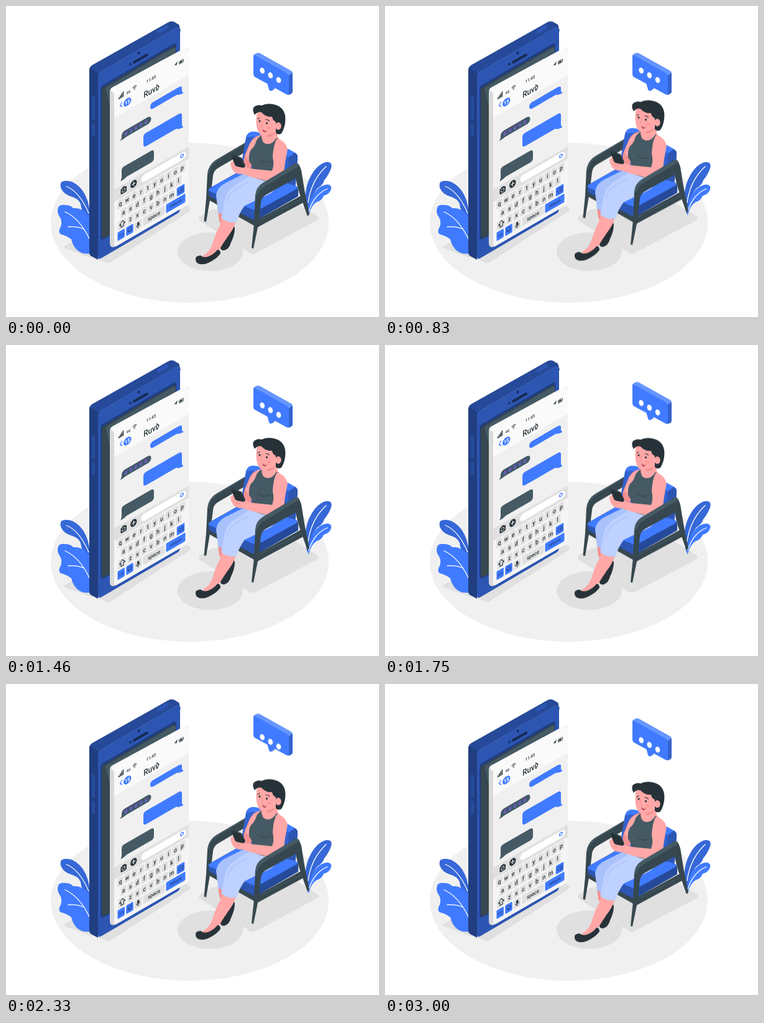
These frames come from a looping animation (600x500 px, 3040 ms). An HTML page:

```html
<!DOCTYPE html>
<html lang="en">
<head>
<meta charset="utf-8">
<title>Chat</title>
<style>
html, body { margin: 0; width: 100%; height: 100%; overflow: hidden; background: #fff; }
svg { display: block; width: 600px; height: 500px; }
text { font-family: Roboto, Inter, sans-serif; text-anchor: middle; }
</style>
</head>
<body>
<svg id="stage" viewBox="0 0 600 500" xmlns="http://www.w3.org/2000/svg"></svg>
<script>
const BLUE = '#407bff', MID = '#2d56b3', DEEP = '#264a99', NIGHT = '#203e80';
const INK = '#263238', SLATE = '#37474f', STEEL = '#455a64';
const SKIN = '#ffa8a7', BLUSH = '#f28f8f', PALE = '#f0f0f0', GREY = '#e0e0e0';

const p = (d, fill) => `<path d="${d}" fill="${fill}"/>`;
const line = (d, color, w = 1) =>
  `<path d="${d}" fill="none" stroke="${color}" stroke-width="${w}" stroke-linecap="round" stroke-linejoin="round"/>`;
const dot = (x, y, r, fill, ry = r) => `<ellipse cx="${x}" cy="${y}" rx="${r}" ry="${ry}" fill="${fill}"/>`;
const box = (x, y, w, h, r, fill) => `<rect x="${x}" y="${y}" width="${w}" height="${h}" rx="${r}" fill="${fill}"/>`;
// Text squeezed by the isometric projection
const label = (s, x, y, size, fill = INK, weight = 500) =>
  `<text transform="translate(${x} ${y}) scale(.866 1)" font-size="${size}" font-weight="${weight}" fill="${fill}">${s}</text>`;
const group = (id, body) => `<g id="${id}">${body}</g>`;

function floor() {
  return dot(295.5, 348.5, 223.5, PALE, 128.5)
    + p('M94 386L112 376L140 390V406L96 390Q92 388 94 386Z', GREY)
    + p('M146 406L162 413Q166 414 170 411L294 331Q300 327 294 323L280 316Z', GREY)
    + p('M312 338L332 327L460 312L500 337Q506 341 500 345L402 397Q397 400 392 397L313 346Q308 342 312 338Z', GREY)
    + dot(328.5, 395, 52.5, GREY, 31);
}

function plants() {
  return p('M89 283Q96 279 107 283Q121 290 128 305Q136 322 135 345L128 335Q121 330 120 318Q116 309 104 306Q92 302 88 292Q87 286 89 283Z', '#3668d8')
    + line('M97 290Q118 298 133 333', '#fff', 1.3)
    + p('M84 324Q86 319 95 320Q104 320 108 325Q121 324 129 333L137 340V398Q121 400 113 391Q107 384 105 375Q97 369 88 367Q83 363 88 355Q91 347 87 340Q81 332 84 324Z', BLUE)
    + line('M95 331Q118 341 134 374M100 355Q116 354 126 359', '#fff', 1.3)
    + p('M485 334Q477 305 487 280Q498 255 515 251Q526 250 523 261Q519 272 512 280Q510 288 501 293Q492 303 490 318Z', '#3668d8')
    + line('M515 258Q491 280 486 316', '#fff', 1.3)
    + p('M486 336Q485 316 496 300Q506 287 518 287Q526 289 522 297Q519 303 511 305Q508 313 500 315Q491 320 487 336Z', BLUE)
    + line('M517 294Q496 302 487 330', '#fff', 1.3);
}

function phone() {
  return p('M134 103Q134 98 139 95L260 27Q266 23 271 26L278 30L281 40L150 130L148 408L137 402Q134 400 134 396Z', NIGHT)
    + p('M135 99Q136 97 139 95L260 27Q266 23 271 26L279 31L149 109Z', DEEP)
    + p('M148 115Q148 109 153 106L272 36Q280 31 280 39V326Q280 331 275 334L154 405Q148 409 148 402Z', MID)
    + line('M149 114Q149 109 153 106L272 36Q279 32 279.5 38', '#4770c0', .7)
    + line('M246 41L258 34', MID, 6)
    + line('M140 147V181M140 190V207', DEEP, 5)
    + line('M142 148V182M142 191V208', MID, 1)
    + p('M152 134Q152 129 156 127L269 61Q274 58 274 64V306L159 374Q152 378 152 371Z', NIGHT)
    + p('M154 137Q154 132 158 130L268 66Q273 63 273 68V306L160 372Q154 375 154 369Z', SLATE)
    + p('M160 132L268 68Q273 65 273 70V110L168 165Z', STEEL)
    + line('M206 90.5L227 78.5', '#162a52', 4)
    + dot(213.5, 75.5, 1.8, '#162a52', 2.2) + dot(200, 93.5, 1.7, '#162a52', 2.1);
}

function status() {
  const bars = [0, 1, 2, 3].map(i => box(7 + i * 2.2, 12.5 - i * 1.9, 1.6, 3 + i * 1.9, .4, INK)).join('');
  return bars + label('4G', 23, 15, 6)
    + line('M30 10Q33 7.4 36 10M31.3 12Q33 10.4 34.7 12', INK, 1) + dot(33, 14, .8, INK)
    + label('11:45', 59.5, 15.3, 7)
    + p('M96.5 12.5L102 8.5L100 15L99.2 12.8Z', INK)
    + `<rect x="104.5" y="10.5" width="7" height="4.6" rx="1.3" fill="${GREY}" stroke="${INK}" stroke-width=".8"/>`
    + box(105.6, 11.5, 4, 2.6, .4, INK)
    + line('M12.5 22.5L9.5 26L12.5 30', BLUE, 1.3)
    + box(15, 21.7, 12.5, 12, 6, BLUE) + label('15', 21.3, 30.8, 8.5, '#fff', 700)
    + label('Ruvi', 58.5, 36.5, 13.5)
    + line('M69.3 28.2L72 32L69.3 36.8', INK, 1.3);
}

function chat() {
  const faces = [19, 27, 35, 43, 51].map(x =>
    dot(x, 76.5, 3.1, MID, 3.4) + dot(x - 1, 75.5, .9, '#e8506a') + dot(x + 1.1, 75.7, .9, '#e8506a')
    + line(`M${x - 1.2} 78.2Q${x} 79.3 ${x + 1.2} 78.2`, SKIN, .8)).join('');
  return box(58, 51.5, 50.5, 10.5, 5, BLUE) + p('M100 52H106Q109 52 109 56V61L111.5 65Q105 65 101 62Z', BLUE)
    + box(12, 71, 47.5, 11.5, 5.5, STEEL) + p('M12 76V79Q12 82 9 83.5Q15 84 20 82Z', STEEL) + faces
    + box(47, 94.5, 62, 21.5, 4.5, BLUE) + p('M101 105H109V116L111.5 120Q104 120 100 116Z', BLUE)
    + box(12, 128, 52, 19, 4.5, STEEL) + p('M12 136V144L10.5 149Q17 149 20 147Z', STEEL);
}

function keyboard() {
  const key = (x, y, w = 9.4, fill = GREY) => box(x - w / 2, y - 7.2, w, 14, 1.6, fill);
  const row = (letters, x, y) => [...letters].map((c, i) =>
    key(x + i * 11.05, y) + label(c, x + i * 11.05, y + 3, 10)).join('');
  const tools = box(0, 156, 120, 20, 0, GREY)
    + box(10.5, 161.5, 9.5, 9, 1.8, INK) + box(13, 160, 4.5, 3, 1, INK)
    + `<circle cx="15.2" cy="166" r="2.5" fill="${INK}" stroke="${GREY}" stroke-width="1"/>`
    + dot(31.3, 165, 5.2, INK, 5.8) + line('M28.6 165H34M31.3 162V168', '#fff', 1.2)
    + box(43.5, 160, 72, 11.5, 5.5, '#fff')
    + `<circle cx="109" cy="165" r="2.3" fill="none" stroke="${BLUE}" stroke-width="1.4"/>`;
  return tools
    + row('qwertyuiop', 10, 185) + row('asdfghjkl', 15.2, 202) + row('zxcvbnm', 26.3, 219)
    + key(12.5, 219, 12.5)
    + line('M8.5 219L13 213.5L17.5 219H15V223.5H11V219Z', INK, 1.1)
    + key(107, 219, 12.5, BLUE) + line('M103 219L105.5 216H111V222H105.5ZM107 218L109 220M109 218L107 220', NIGHT, .9)
    + key(11.2, 235.5, 11.5, BLUE) + label('123', 11.2, 238, 6, NIGHT)
    + key(25, 235.5, 11.5, BLUE) + `<circle cx="25" cy="235" r="3" fill="none" stroke="${NIGHT}"/>`
    + line('M23.5 236Q25 237.5 26.5 236', NIGHT, .8)
    + key(38.5, 235.5, 11.5) + box(37, 230.5, 3.2, 6, 1.6, INK) + line('M35.6 235Q36 238 38.6 238Q41.2 238 41.6 235M38.6 238V240', INK, .9)
    + key(64, 235.5, 35) + label('space', 64, 238.3, 8.5)
    + key(99, 235.5, 31, BLUE) + label('return', 99, 238, 8, NIGHT);
}

function screen() {
  return p('M167 138Q167 133 171 131L287 68Q294 65 294 72V313Q294 318 289 321L178 386Q167 391 167 381Z', '#d9d9d9')
    + p('M168 135Q169 132 171 131L287 68Q291 66 293 69L294 74L175 142Z', '#fafafa')
    + `<clipPath id="face"><rect width="120" height="249" rx="5"/></clipPath>
       <g transform="matrix(1 -.577 0 1 174 139)" clip-path="url(#face)">`
    + box(0, 0, 120, 249, 0, PALE) + box(0, 0, 120, 41, 0, '#fafafa') + box(0, 176, 120, 73, 0, '#f5f5f5')
    + status() + chat() + keyboard() + '</g>';
}

function chairBack() {
  return p('M386 219L340 246Q326 254 324 270L322 310L318.5 346L322 347L329 306L333 273Q334 264 342 260L390 232Z', SLATE)
    + line('M386 220L341 247Q328 255 326 269', STEEL, 2)
    + p('M379 252L386 211Q388 203 397 202L405 203L465 236Q470 239 469 245L465 300L436 312Z', '#3262cf')
    + p('M388 207Q391 202 398 202L405 203L465 236L455 243L406 213Q395 207 388 212Z', BLUE)
    + p('M455 243L465 236Q470 239 469 245L466 285L452 300Z', MID)
    + p('M323 300L404 344L478 303L481 312L404 356L323 310Z', SLATE)
    + p('M326 298Q325 294 329 292L375 266L468 290Q471 293 470 306L404 344Q400 345 396 343L328 306Q326 304 326 298Z', DEEP)
    + p('M326 297Q325 294 329 292L378 265L466 289Q471 292 466 295L406 328Q402 330 398 328L329 300Z', BLUE)
    + p('M326 297L398 328Q402 330 404 329V344Q400 345 396 343L328 306Q326 304 326 297Z', MID);
}

function chairFront() {
  return p('M403 344L480 305L482 314L404 356L399 353Z', SLATE)
    + line('M406 346L478 309', STEEL, 1.2)
    + p('M462 253Q472 252 475 264L480 295L488 335L485 338L472 301Q467 285 466 275Z', SLATE)
    + p('M466 253L414 284Q402 291 401 305L399 350L395 389L398 390L406 351L410 316Q411 307 419 303L468 276Q475 271 473 260Q472 252 466 253Z', SLATE)
    + p('M466 253L414 284Q402 291 401 305L404 306Q406 296 416 290L472 257Q470 252 466 253Z', STEEL);
}

function legs() {
  return p('M341 328L358 334L360 355Q362 367 352 383L347 388L350 362L343 345Z', BLUSH)
    + p('M345 389Q344 383 350 380Q359 371 361 355Q366 350 368 357Q368 368 362 380Q359 391 351 393Q345 393 345 389Z', INK)
    + p('M348 339L370 346Q366 360 354 374L343 392Q336 403 318 406L317 401Q327 396 332 383Q338 363 345 351Z', SKIN)
    + p('M305 407Q304 402 313 401Q317 405 325 403Q335 399 340 392Q345 391 345 398Q340 405 331 410Q318 418 309 414Q305 412 305 407Z', INK)
    + p('M390 266L352 285Q340 291 338 304L341 331Q348 337 355 335L364 308L420 282Z', '#a9c2fc')
    + p('M397 270L367 289Q355 297 352 311L346 341Q359 351 371 347Q375 333 384 321L420 304Q434 298 438 285Z', '#bed1ff')
    + line('M390 283L369 295Q358 302 356 314', '#9db8f7', .9);
}

function body() {
  return p('M411 207Q398 209 392 221L384 240Q381 248 383 258L394 262L400 232Z', BLUSH)
    + p('M410 208Q398 211 392 222L385 241L390 248L404 224Z', SKIN)
    + p('M419 202L437 200V211Q444 216 432 222Q418 225 410 218L411 208L420 207Z', SKIN)
    + p('M419 205Q428 206 434 201Q431 210 420 211Z', BLUSH)
    + p('M411 208Q404 212 402 219Q400 226 394 231Q390 238 391 249L396 257Q396 267 393 272Q410 282 434 284Q437 265 440 244L441 218Q439 213 435 212Q430 222 419 222Q411 220 411 208Z', STEEL)
    + line('M407 247Q414 254 424 249', SLATE, 1.1)
    + p('M436 213Q449 216 453 230L449 252L446 276Q444 286 434 285L395 275L374 268L381 258L398 262L428 265Q432 255 429 243Q430 222 436 213Z', SKIN)
    + p('M361 254Q362 248 369 249L384 252Q389 258 385 266Q381 273 371 269Q363 266 361 254Z', SKIN)
    + line('M366 259Q370 263 376 263', BLUSH, 1)
    + p('M363 242Q362 239 366 240L377 243Q379 244 380 246L385 256Q385 260 381 260L371 258Q369 257 368 255Z', INK)
    + line('M364 241L377 244L384 257', SLATE, 1);
}

function head() {
  return p('M404 170Q401 185 404 198Q407 207 413 209Q423 208 433 203L443 180L432 164Z', SKIN)
    + p('M398 171Q396 163 401 161Q406 158 411 160Q419 156 430 158Q446 161 449 176Q451 192 443 205Q438 208 434 204L434 186Q429 184 428 178Q418 179 411 171Q405 169 400 175Z', INK)
    + dot(438, 193, 4.8, SKIN, 6) + line('M436 192Q438 189 440 191', BLUSH, .9)
    + dot(408, 185, 1.5, INK, 1.8) + dot(419.5, 188.5, 1.5, INK, 1.8)
    + line('M405 181.5L408 180M418 182.5Q422 182.5 423.5 185', INK, 1.1)
    + line('M412.5 186L410.5 193.5L413 194.5', BLUSH, 1)
    + p('M412.5 198Q416 200 419.5 199.5Q418 204 414.5 202.5Q412.5 201 412.5 198Z', '#b93c4c')
    + p('M413 198.4Q416 200 419 199.6L417.8 200.8Q415 201 413 198.4Z', '#fff')
    + dot(423, 196, 3, '#ff9a9a', 2.4);
}

function bubble() {
  const dots = [0, 1, 2].map(i =>
    `<ellipse rx="3.7" ry="4.9" fill="#fff" transform="translate(${412.2 + i * 13.2} ${103.8 + i * 7.6}) rotate(-20)"/>`).join('');
  return group('bubble',
    p('M398 81Q398 78 401 77L404 75.8Q406 75 408 76L458 104Q461 106 461 109V138Q461 140 459 141L455 143L430 125Z', '#3362cc')
    + p('M398.5 80Q399 78 401 77L404 75.8Q406 75 408 76L458 104Q460 105 461 107L454.5 112Z', '#6696ff')
    + p('M398 82Q398 78 402 80L452 108Q455 110 455 113V140Q455 144 451 142L432 131.5L426 136.5Q424 137 423 134L420.5 125L401 114.5Q398 113 398 109Z', BLUE)
    + p('M426 136.5L432 131.5L433 132L429 135.5Z', '#3362cc'))
    + group('dots', dots);
}

document.getElementById('stage').innerHTML = floor() + plants() + phone() + screen()
  + group('sitter', chairBack() + legs() + body() + head() + chairFront()) + bubble();

const LOOP = 3040;
const sway = [[0, 0], [540, -3.8], [1080, -7.4], [1460, -8], [1750, -7.8], [2170, -5.2], [2710, -2], [3000, -.1], [LOOP, 0]];
const rise = [[0, 0], [950, 0], [1080, -2.3], [1170, -4], [1630, -13.5], [2080, -22.3], [2170, -24.3],
  [2350, -28], [2450, -29.3], [2630, -27.2], [2750, -25.2], [3000, -20.2], [LOOP, -19.4]];

function float(id, steps, scale = 1) {
  document.getElementById(id).animate(
    steps.map(([t, y]) => ({ offset: t / LOOP, transform: `translateY(${y * scale}px)` })),
    { duration: LOOP, iterations: Infinity });
}
float('sitter', sway);
float('bubble', rise);
float('dots', rise, .67);
</script>
</body>
</html>
```
